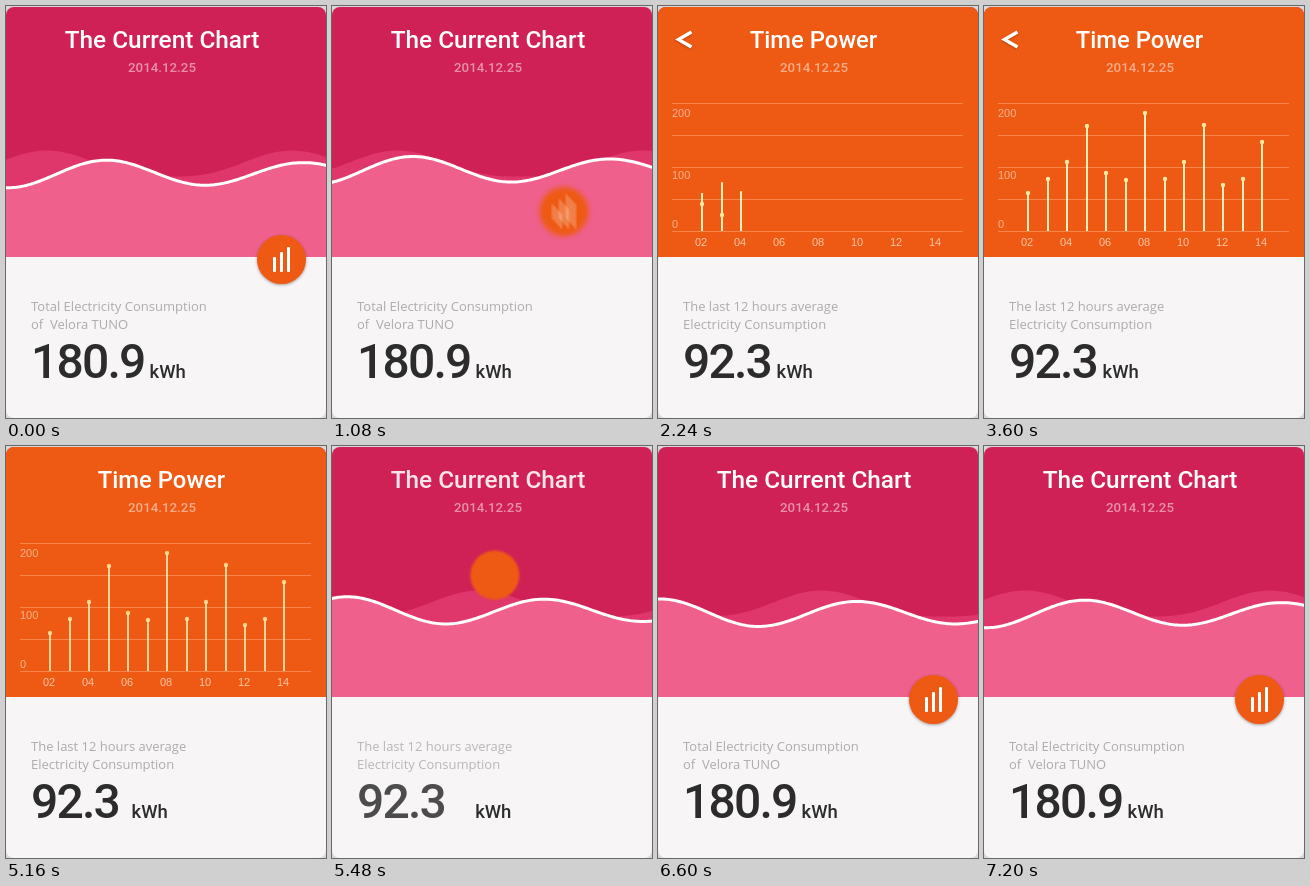
Write an HTML page with a canvas that moves like this. It is 320x412 px and loops after 7.24 s.

```html
<!DOCTYPE html>
<html lang="en">
<head>
<meta charset="utf-8">
<title>Power chart</title>
<style>
html, body { margin: 0; width: 100%; height: 100%; overflow: hidden; background: #d9d8d8; }
canvas { display: block; width: 320px; height: 412px; }
</style>
</head>
<body>
<canvas id="stage"></canvas>
<script>
const W = 320, H = 412, SPLIT = 251, LOOP = 7240, STEP = 40;
const dpr = window.devicePixelRatio || 1;
const ORANGE = '#ee5a14';
const DIN = 'Roboto, sans-serif', SANS = '"Open Sans", sans-serif', ARIAL = '"Liberation Sans", sans-serif';

const stage = document.getElementById('stage');
stage.width = W * dpr;
stage.height = H * dpr;
const ctx = stage.getContext('2d');
ctx.scale(dpr, dpr);

const TAU = Math.PI * 2;
const mix = (a, b, k) => a + (b - a) * k;
const ramp = (t, a, b) => Math.min(1, Math.max(0, (t - a) / (b - a)));
const ease = u => (1 - Math.cos(Math.PI * u)) / 2;
// rises over a..b, falls over c..d
const span = (t, a, b, c, d) => ease(ramp(t, a, b)) - ease(ramp(t, c, d));

function keyed(t, keys) {
  if (t <= keys[0][0]) return keys[0][1];
  for (let i = 1; i < keys.length; i++) {
    const [t0, v0] = keys[i - 1], [t1, v1] = keys[i];
    if (t < t1) return mix(v0, v1, (t - t0) / (t1 - t0));
  }
  return keys[keys.length - 1][1];
}

function text(str, x, y, font, color, alpha = 1, align = 'left', spacing = 0) {
  if (alpha <= 0) return;
  ctx.globalAlpha = alpha;
  ctx.font = font;
  ctx.fillStyle = color;
  ctx.textAlign = align;
  ctx.letterSpacing = spacing + 'px';
  ctx.fillText(str, x, y);
  ctx.globalAlpha = 1;
}

function circle(x, y, r) {
  ctx.beginPath();
  ctx.arc(x, y, r, 0, TAU);
  ctx.fill();
}

// Waves
function wave(yAt, fill, stroke) {
  ctx.beginPath();
  for (let x = -4; x <= W + 4; x += 2) ctx.lineTo(x, yAt(x));
  if (stroke) {
    ctx.strokeStyle = stroke;
    ctx.lineWidth = 3;
    ctx.stroke();
    return;
  }
  ctx.lineTo(W + 4, SPLIT);
  ctx.lineTo(-4, SPLIT);
  ctx.fillStyle = fill;
  ctx.fill();
}

function drawWaves(t) {
  const p = t / 1200;
  const hump = u => (1 + Math.cos(TAU * u)) / 2;
  const back = x => 170.5 - 26 * hump((x - 41) / 245 + p) ** 1.5;
  const mid = 167.3 + 5.8 * Math.sin(TAU * p);
  const front = x => mid - (14.4 - 0.0125 * x) * Math.cos(TAU * ((x - 101.5) / 197 - p));
  ctx.fillStyle = '#d02156';
  ctx.fillRect(0, 0, W, SPLIT);
  wave(back, '#df366b');
  wave(front, '#ef608c');
  wave(front, null, '#fff');
}

// Round button that travels to the middle and floods the top half
function disc(t) {
  const move = span(t, 900, 1328, 5440, 5840);
  const press = 1 + 0.1 * span(t, 640, 800, 800, 940);
  return {
    x: mix(275.5, 160, move),
    y: mix(253.5, 126, move),
    r: 24.5 * press + 182 * span(t, 1310, 1540, 5260, 5470)
  };
}

function drawIcon(d, alpha) {
  ctx.globalAlpha = alpha;
  ctx.fillStyle = '#fff';
  [15, 20, 25].forEach((h, i) => {
    ctx.beginPath();
    ctx.roundRect(d.x - 8.5 + i * 7, d.y + 12.5 - h, 3, h, 1);
    ctx.fill();
  });
  ctx.globalAlpha = 1;
}

function drawButton(t) {
  const d = disc(t), next = disc(t + 10);
  const speed = Math.hypot(next.x - d.x, next.y - d.y);
  const moving = speed > 0.5, flooding = d.r > 28;

  ctx.save();
  if (flooding) {
    ctx.beginPath();
    ctx.rect(0, 0, W, SPLIT);
    ctx.clip();
  }
  ctx.fillStyle = ORANGE;
  if (moving) {
    ctx.filter = `blur(${speed * 0.4 * dpr}px)`;
  } else if (!flooding) {
    ctx.shadowColor = 'rgba(60,20,20,.4)';
    ctx.shadowBlur = 3 * dpr;
    ctx.shadowOffsetY = dpr;
  }
  circle(d.x, d.y, d.r);
  ctx.restore();

  const show = 1 - span(t, 1000, 1320, 5480, 5800);
  const copies = moving ? 8 : 1;
  for (let i = 0; i < copies; i++) {
    const shift = moving ? (i / (copies - 1) - 0.5) * 22 : 0;
    drawIcon(disc(t + shift), show / copies);
  }
}

// Bar chart
const TOPS = [187, 173, 156, 120, 167, 174, 107, 173, 156, 119, 179, 173, 136];
const DOT = [[80, 0], [150, 0.31], [230, 0.71], [340, 1.07], [460, 0.98], [600, 1]];
const BASE = 225;

function drawGrid(t) {
  const a = span(t, 1640, 1960, 5180, 5360);
  if (a <= 0) return;
  ctx.globalAlpha = a;
  ctx.fillStyle = 'rgba(255,225,190,.33)';
  for (let y = 97; y <= BASE; y += 32) ctx.fillRect(14, y, 291, 1);
  ['200', '100', '0'].forEach((s, i) =>
    text(s, 14, [111, 173, 222][i], '11px ' + ARIAL, '#f8b48e', a));
  for (let i = 0; i < 7; i++) {
    const hour = String(2 + i * 2).padStart(2, '0');
    text(hour, 43 + i * 39, 240, '11px ' + ARIAL, '#fbc6a6', a, 'center');
  }
}

function drawBars(t) {
  const alpha = 1 - ramp(t, 5120, 5340);
  if (alpha <= 0) return;
  ctx.globalAlpha = alpha;
  TOPS.forEach((top, i) => {
    const age = t - 2010 - i * 80;
    if (age <= 0) return;
    const x = Math.round(44 + i * 19.5), full = BASE - top;
    const u = 1 - ramp(age, 0, 200), rise = keyed(age, DOT);
    const h = full * Math.max(1 - u * u, rise);
    ctx.fillStyle = '#fff0b8';
    ctx.fillRect(x - 1, BASE - h, 2, h);
    if (rise > 0) {
      ctx.fillStyle = '#ffeaa0';
      circle(x, BASE - full * rise, 2.2);
    }
  });
  ctx.globalAlpha = 1;
}

function drawArrow(t) {
  const a = span(t, 1760, 2040, 4540, 4720);
  if (a <= 0) return;
  const s = t > 4500 ? mix(0.8, 1, a) : 1;
  ctx.save();
  ctx.globalAlpha = a;
  ctx.translate(26, 33.5);
  ctx.scale(s, s);
  ctx.strokeStyle = '#fff';
  ctx.lineWidth = 3.4;
  ctx.shadowColor = 'rgba(90,30,0,.4)';
  ctx.shadowBlur = 2 * dpr;
  ctx.shadowOffsetY = dpr;
  ctx.beginPath();
  ctx.moveTo(7.5, -7.5);
  ctx.lineTo(-5.5, 0);
  ctx.lineTo(7.5, 7.5);
  ctx.stroke();
  ctx.restore();
}

// Text
const outA = m => Math.max(0, 1 - 2 * m);
const inA = m => Math.max(0, 2 * m - 1);

function drawHeader(t) {
  const m = span(t, 1560, 1840, 5260, 5520);
  text('The Current Chart', 156, 41.5, '500 24.4px ' + DIN, '#fff', outA(m), 'center');
  text('Time Power', 155.5, 41.5, '500 23.8px ' + DIN, '#fff', inA(m), 'center');
  text('2014.12.25', 156, 66, '500 13.3px ' + DIN, 'rgba(255,255,255,.5)', 1, 'center');
}

function drawPanel(t) {
  const m = span(t, 1600, 1960, 5400, 5840);
  const lines = (a, b, alpha) => {
    text(a, 25, 305, '13px ' + SANS, '#adabab', alpha);
    text(b, 25, 323, '13px ' + SANS, '#adabab', alpha);
  };
  const figure = (s, x, alpha) =>
    text(s, x, 372, '500 48px ' + DIN, '#2c2c2c', alpha, 'left', -1.8);
  lines('Total Electricity Consumption', 'of \u00a0Velora TUNO', outA(m));
  lines('The last 12 hours average', 'Electricity Consumption', inA(m));
  figure('180.9', 25, outA(m));
  figure('92.3', 25, inA(m));
  const unitX = mix(143.5, 118.5, span(t, 1600, 2120, 4960, 5523));
  text('kWh', unitX, 372, '500 18.5px ' + DIN, '#2c2c2c');
}

function draw(t) {
  ctx.fillStyle = '#d9d8d8';
  ctx.fillRect(0, 0, W, H);
  ctx.save();
  ctx.beginPath();
  ctx.roundRect(0, 1, W, H - 1, 8);
  ctx.clip();
  drawWaves(t);
  ctx.fillStyle = '#f7f5f6';
  ctx.fillRect(0, SPLIT, W, H - SPLIT);
  drawPanel(t);
  drawButton(t);
  drawGrid(t);
  drawBars(t);
  drawHeader(t);
  drawArrow(t);
  ctx.restore();
}

const start = performance.now();
function tick() {
  const t = (performance.now() - start) % LOOP;
  draw(Math.floor(t / STEP) * STEP);
  requestAnimationFrame(tick);
}
tick();
</script>
</body>
</html>
```
